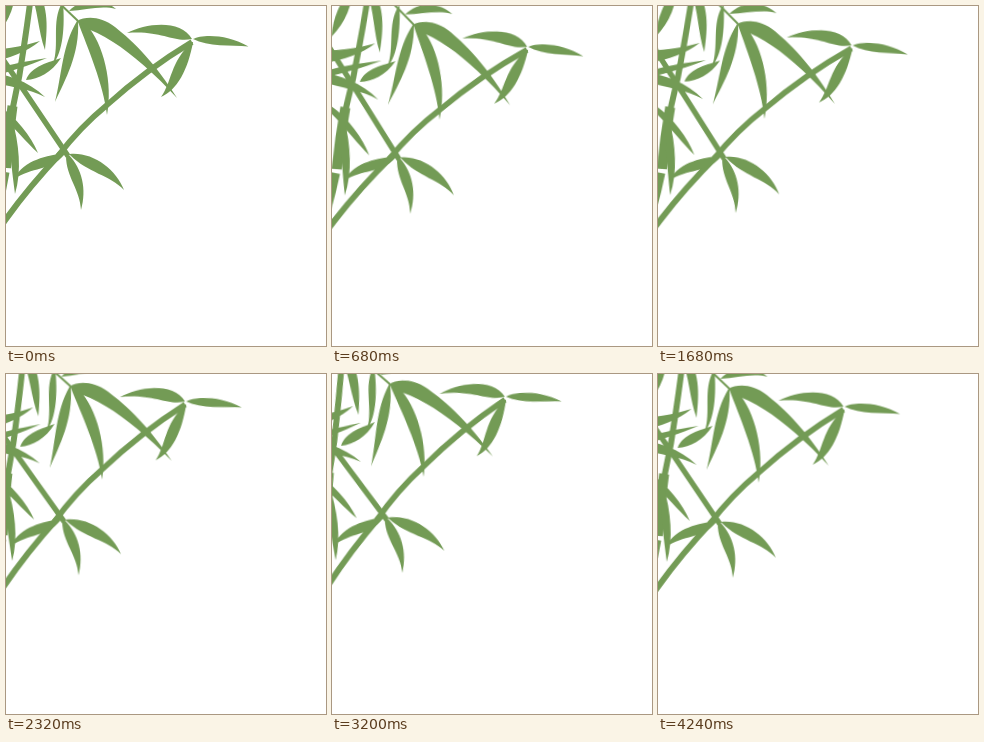
An HTML page that plays this animation: 320 px wide and 340 px high, repeating every 4.28 s.

```html
<!DOCTYPE html>
<html lang="en">
<head>
<meta charset="utf-8">
<title>Swaying bamboo</title>
<style>
  html, body { margin: 0; width: 100%; height: 100%; overflow: hidden; background: #fff; }
  svg { display: block; width: 320px; height: 340px; }
  .branch {
    fill: #739b55;
    transform-origin: -30px 296px;
    animation: sway 4280ms linear infinite;
  }
  .stems { fill: none; stroke: #739b55; }
  @keyframes sway {
    0%, 100% { transform: rotate(0deg); }
    29.44% { transform: rotate(3.75deg); }
    65.42% { transform: rotate(-3.85deg); }
  }
</style>
</head>
<body>
<svg viewBox="0 0 320 340">
  <g class="branch">
    <g class="stems">
      <path stroke-width="6" d="M-45 276C-25 247 -12 230 0 213C18 188 36 167 55 147"/>
      <path stroke-width="5.6" d="M52 150C68 129 84 113 101 99C122 80 152 56.5 186 36"/>
      <path stroke-width="5.4" d="M-22 25L-8 46L62 150"/>
      <path stroke-width="6" d="M27 -28Q24 0 18 40Q14 70 7 101"/>
      <path stroke-width="10" d="M6.500 100Q2 130 0 162"/>
      <path stroke-width="9" d="M-1 166Q-4 184 -9 204"/>
      <path stroke-width="2" d="M50 -6L72 15"/>
    </g>

    <!-- upper right cluster -->
    <path d="M187 33C196 28 222 28 242.500 40.500C225 39 202 41 187 33Z"/>
    <path d="M121 27C140 17 175 13 186 33C167 37 155 24 121 27Z"/>
    <path d="M186 36C164 56 166 76 155 91C171 84 182 64 187 36Z"/>

    <!-- centre cluster -->
    <path d="M71 15C80 10 95 10 109 21C128 36 149 57 171 92C149 68 126 48 107 36Q90 25 78 22Z"/>
    <path d="M72 16C82 43 97 77 101 109C107 78 98 38 80 18Z"/>
    <path d="M71 15C56 40 56 68 49 96C59 74 74 48 72 15Z"/>
    <path d="M56 -3C45 16 54 38 47 58C57 46 59 20 57 -3Z"/>
    <path d="M63 5C75 -8 96 -9 110 3C95 -1 80 4 63 5Z"/>
    <path d="M55 52C44 56 25 60 20 74C33 73 45 67 55 52Z"/>

    <!-- left edge -->
    <path d="M24 -16C32 3 32 25 39 44C41 26 44 0 29 -20Z"/>
    <path d="M-10 30C-9 10 -3 -4 10 -24C10 -2 4 14 -10 30Z"/>
    <path d="M-24 44C-5 44 15 41 34 35C20 46 5 52 -18 57Z"/>
    <path d="M-20 66C0 59 15 56 41 52C22 60 5 65 -16 71Z"/>
    <path d="M-22 66C0 67 22 75 39 91C22 82 2 81 -18 75Z"/>
    <path d="M-8 99C10 111 25 130 32 147C20 136 8 121 -8 106Z"/>
    <path d="M3 112C2 135 6 164 9 188C16 165 13 137 6 113Z"/>

    <!-- lower cluster -->
    <path d="M58 147C42 150 18 153 8 173C26 161 44 165 58 149Z"/>
    <path d="M60 150C60 171 74 183 75 204C81 183 76 163 63 149Z"/>
    <path d="M64 148C87 146 110 163 118 184C104 169 82 167 64 149Z"/>
  </g>
</svg>
</body>
</html>
```
